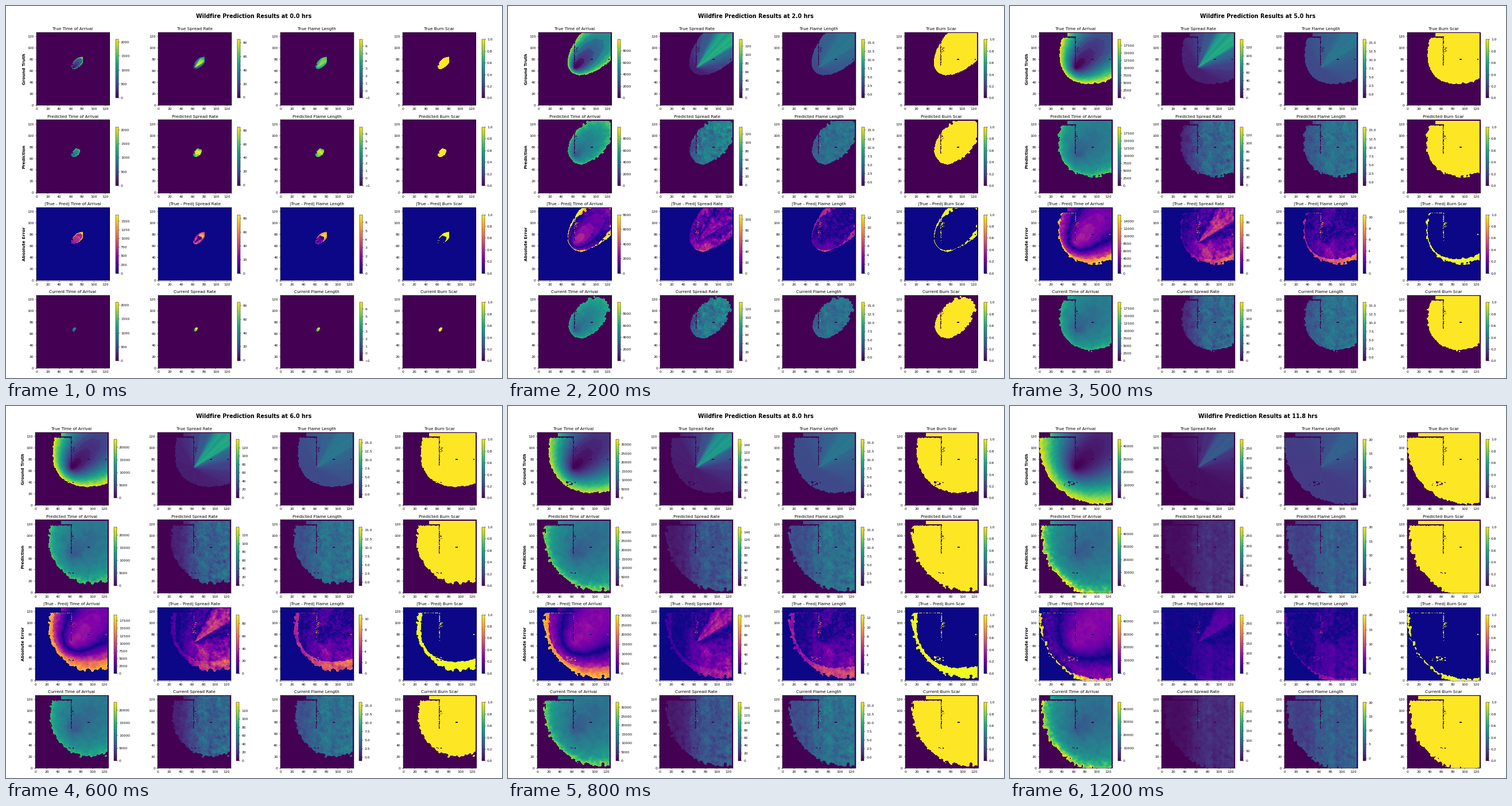
Recreate the animation shown at these times as a matplotlib script. Size 864 by 648 pixels, loop 1300 ms.

```python
import numpy as np
import matplotlib.pyplot as plt
from matplotlib.animation import FuncAnimation

W, H, N = 864, 648, 128
FRAMES, LAST = 13, 11.8
LEAD = .46  # hours by which the forecast runs ahead of the clock
Y, X = np.mgrid[0:N, 0:N].astype(float)
DX, DY = X - 63, Y - 65
RADIUS = np.hypot(DX, DY)
ANGLE = np.degrees(np.arctan2(DY, DX))
ALONG = (DX + DY) / np.sqrt(2)  # distance downwind, to the north-east
OFF_WIND = (ANGLE - 45 + 180) % 360 - 180


def smooth_noise(seed, passes, shape=(N, N)):
    f = np.random.default_rng(seed).normal(size=shape)
    for _ in range(passes):
        for ax in range(f.ndim):
            f = (np.roll(f, 1, ax) + 2 * f + np.roll(f, -1, ax)) / 4
    return (f - f.mean()) / f.std()


def arrival(eccentricity, rough, seed):
    """Hours until an elliptical front, lit at its rear focus, gets here."""
    return (RADIUS - eccentricity * ALONG) / 7.2 * (1 + rough * smooth_noise(seed, 4))


def unburnable(seed, hx, hy, rx, ry):
    """Road, rock specks, a patchy area and the border never burn."""
    u = np.random.default_rng(seed).random((N, N))
    road = (Y >= 69) & (Y <= 119) & (((X == 62) & (u < .9)) | ((X == 63) & (u < .5)))
    road |= (X < 64) & ((Y == 118) | (Y == 119) | ((Y == 117) & (u < .3)))
    specks = (abs(X - 66) < 3) & (abs(Y - 96) < 6) & (u < .22)
    specks |= (abs(X - 92.5) < 2) & (abs(Y - 79.5) < 1)
    patch = ((X - hx) / rx) ** 2 + ((Y - hy) / ry) ** 2 < 1
    return road | specks | (patch & (smooth_noise(seed + 1, 2) > 1.1)) | (X > 125) | (Y > 125)


SOUTHEAST = np.clip(np.cos(np.radians(ANGLE + 50)), 0, 1) ** 2
T_TRUE = arrival(.866, .02, 3)
T_PRED = arrival(.8, .035, 4) / (1 + .2 * SOUTHEAST)
HOLES_TRUE = unburnable(11, 54, 37, 15, 5) | ((abs(X - 122.5) < 1) & (abs(Y - 79.5) < 1))
HOLES_PRED = unburnable(21, 60, 33, 7, 5)

RAYS = smooth_noise(5, 2, (240,))[((ANGLE + 180) / 1.5).astype(int) % 240]
SECTOR = 1 / (1 + np.exp((abs(OFF_WIND) - 15) / 1.2))
FAN = (11 + 38 * np.exp(-(OFF_WIND / 45) ** 2) + 31 * SECTOR) * (1 + .06 * RAYS)

BLOTCH, GRAIN = smooth_noise(6, 12), smooth_noise(7, 2)
STRIPES = smooth_noise(8, 12, (N,))[None, :]
SIDE = 1 / (1 + np.exp(-(X - 60) / 12))
HOT = np.exp(-((X - 67) ** 2 + (Y - 69) ** 2) / 32)
SPARK = ((abs(X - 63) < 4) & (abs(Y - 92) < 12)
         & (np.random.default_rng(9).random((N, N)) < .12))


def pred_front(t):
    """The predicted fire overshoots around hour 7, then falls back."""
    return .95 * t + 2.1 * np.exp(-((t - 7.6) / 2) ** 2)


def fill(arrive, limit, holes, h, *fields):
    strip = X > 62 - 4.4 * (h - 2)  # ground beyond the road burns late
    burn = (arrive < limit) & ~holes & ((Y <= 118) | strip)
    return [np.where(burn, f, -1) for f in fields] + [burn.astype(float)]


def true_fields(h):
    t = h + LEAD
    secs = 3600 * T_TRUE
    time = .5 * secs + .5 * np.floor(secs / 1500) * 1500
    spread = FAN * (1 - .45 * np.clip(T_TRUE / t, 0, 1) ** 4 * np.exp(-2 * h))
    return fill(T_TRUE, t, HOLES_TRUE, h, time, spread, 1.2 * spread ** .35)


def pred_fields(h, vmax, lag=0):
    t = h + LEAD
    u = np.clip(T_PRED / pred_front(t), 0, 1)
    blotch, grain = np.roll(BLOTCH, int(2 * h), 1), np.roll(GRAIN, -int(2 * h), 0)
    rim = .2 + .3 * np.clip((h - 7) / 3, 0, 1)
    time = vmax[0] * (.24 + .3 * np.sqrt(u) + rim * u ** 6 + .012 * blotch)
    texture = .1 * blotch + .09 * grain + .12 * STRIPES * h / LAST
    spark = SPARK * min(h / 2, 1)
    spread = ((8 + 30 * SIDE) * (1 + np.exp(-h / 4)) * (1 + texture)
              + 40 * HOT * np.exp(-h / 3) + spark * .35 * vmax[1])
    flame = ((3 + 2.5 * SIDE) * (1 + .8 * texture)
             + 2.2 * HOT * np.exp(-h / 2) + spark * .3 * vmax[2])
    return fill(T_PRED, pred_front(t - lag), HOLES_PRED, h,
                np.minimum(time, vmax[0]), spread, flame)


def value_limits(h):
    return [np.interp(h, [0, 2, 3, 7, 10], [2095, 9960, 12450, 26750, 45100]),
            np.interp(h, [0, 1, 7, 10, LAST], [85, 135, 140.5, 181, 294]),
            np.interp(h, [0, 1, 10, LAST], [6.9, 15.9, 15.9, 20.1]), 1]


def error_limits(h, vmax):
    dip = 1 - .34 * max(0, np.sin(np.pi * h / 10))
    ratios = np.interp(h, [5, 10], [.805, 1]), dip, dip, 1
    return [v * k for v, k in zip(vmax, ratios)]


fig = plt.figure(figsize=(20, 15), dpi=43.2)
title = fig.suptitle("", fontsize=16, fontweight="bold")
ROWS = ["True", "Predicted", "|True - Pred|", "Current"]
COLS = ["Time of Arrival", "Spread Rate", "Flame Length", "Burn Scar"]
LABELS = ["Ground Truth", "Prediction", "Absolute Error", ""]

panels = {}
for r, row in enumerate(ROWS):
    for c, col in enumerate(COLS):
        ax, cax = fig.add_axes([0, 0, .1, .1]), fig.add_axes([0, 0, .01, .1])
        im = ax.imshow(np.zeros((N, N)), origin="lower", vmin=0, vmax=1,
                       cmap="plasma" if r == 2 else "viridis")
        ax.set_title(f"{row} {col}", fontsize=12)
        ax.set_xticks(range(0, 121, 20))
        ax.set_yticks(range(0, 121, 20))
        if c == 0:
            ax.set_ylabel(LABELS[r], fontsize=12, fontweight="bold")
        fig.colorbar(im, cax=cax)
        panels[r, c] = ax, cax, im


def place(ax, x, bottom, w, h):
    ax.set_position([x / W, 1 - bottom / H, w / W, h / H])


def update(i):
    h = min(i, LAST)
    title.set_text(f"Wildfire Prediction Results at {h:.1f} hrs")
    vmax = value_limits(h)
    emax = error_limits(h, vmax)
    # Five-digit colorbar labels squeeze the columns a little.
    left, pitch, bar = (50.6, 213.65, 137) if vmax[0] > 1e4 else (52.6, 212.7, 137.9)
    true, pred = true_fields(h), pred_fields(h, vmax)
    error = [abs(a - b) for a, b in zip(true, pred)]
    current = pred_fields(h, vmax, lag=.25)
    for r, fields in enumerate((true, pred, error, current)):
        for c, data in enumerate(fields):
            ax, cax, im = panels[r, c]
            x, bottom = left + pitch * c, 173.2 + 152.65 * r
            place(ax, x, bottom, 127.6, 127.6)
            place(cax, x + bar, bottom - 12.76, 5.1, 102.08)
            im.set_data(data)
            low = 0 if r == 2 or c == 3 else -1
            im.set_clim(low, emax[c] if r == 2 else vmax[c])
    return []


anim = FuncAnimation(fig, update, frames=FRAMES, interval=100, repeat=True,
                     repeat_delay=0, init_func=lambda: [], blit=False)
plt.show()
```
